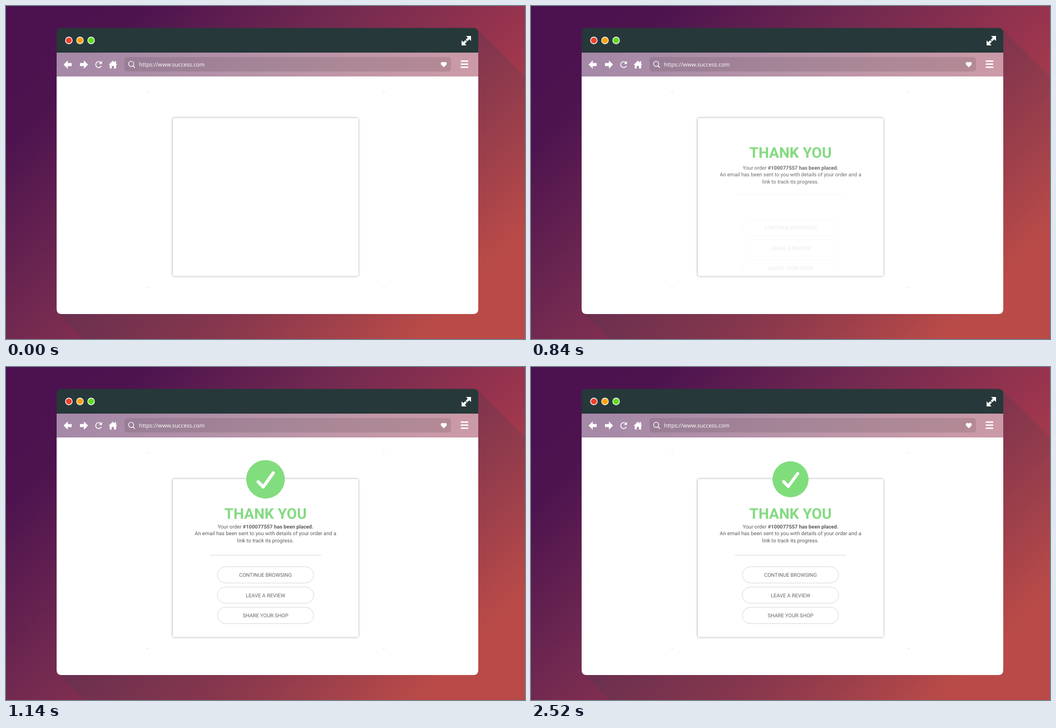
Recreate the animation shown at these times as an HTML page. Size 933 by 600 pixels, loop 2550 ms.

```html
<!DOCTYPE html>
<html lang="en">
<head>
<meta charset="utf-8">
<title>Order placed</title>
<style>
  html, body { margin: 0; width: 100%; height: 100%; overflow: hidden; }
  svg { display: block; width: 933px; height: 600px; }
  text { text-rendering: geometricPrecision; }
  .url { font: 10px "Open Sans", sans-serif; fill: #fff; }
  .card { font: 9.333px Roboto, sans-serif; fill: #5c5c5c; text-anchor: middle; }
  .title { font-size: 26.667px; font-weight: 700; fill: #83da80; }
  .bold { font-weight: 700; }
  .part { opacity: 0; }
  .line { fill: none; stroke: #fff; }
</style>
</head>
<body>
<svg viewBox="0 0 933 600">
  <defs>
    <linearGradient id="sky" gradientUnits="userSpaceOnUse" x1="0" y1="0" x2="766.5" y2="766.5">
      <stop offset="0" stop-color="#4c1150"/>
      <stop offset=".16" stop-color="#4c134f"/>
      <stop offset=".4" stop-color="#732a50"/>
      <stop offset=".62" stop-color="#99344e"/>
      <stop offset=".86" stop-color="#b94a48"/>
    </linearGradient>
    <linearGradient id="shade" gradientUnits="userSpaceOnUse" x1="0" y1="0" x2="766.5" y2="766.5">
      <stop offset=".62" stop-color="#333f4a" stop-opacity=".2"/>
      <stop offset=".88" stop-color="#333f4a" stop-opacity="0"/>
    </linearGradient>
    <filter id="soft" x="-10%" y="-10%" width="120%" height="120%">
      <feGaussianBlur stdDeviation="2.2"/>
    </filter>
    <clipPath id="view"><rect x="253" y="154.5" width="427" height="353"/></clipPath>
  </defs>

  <rect width="933" height="600" fill="url(#sky)"/>
  <path d="M848 42L933 127V600H141L94 553V300H848Z" fill="url(#shade)"/>

  <!-- window -->
  <path d="M91 84V48.500Q91 39.500 100 39.500H840Q849 39.500 849 48.500V84Z" fill="#263839"/>
  <rect x="91" y="84" width="758" height="43" fill="#fff" opacity=".5"/>
  <path d="M91 127H849V546Q849 555 840 555H100Q91 555 91 546Z" fill="#fff"/>
  <g stroke="#fff" stroke-width="1.3">
    <circle cx="113" cy="62" r="6" fill="#f0402c"/>
    <circle cx="133" cy="62" r="6" fill="#faa00c"/>
    <circle cx="153" cy="62" r="6" fill="#5fdb1e"/>
  </g>
  <g fill="#fff">
    <path d="M836 54V63L832.900 59.900L829.300 63.500L826.500 60.700L830.100 57.100L827 54Z"/>
    <path d="M819 71V62L822.100 65.100L825.700 61.500L828.500 64.300L824.900 67.900L828 71Z"/>
    <path d="M103.500 105.500L111 98V102.700H118V108.300H111V113Z"/>
    <path d="M147.500 105.500L140 98V102.700H133V108.300H140V113Z"/>
    <path d="M172.500 99V104.500H167Z"/>
    <path d="M192 98.500L195.500 101.700V99.500H198V104L200 106H198V112.500H194V108H190V112.500H186.500V106H184.500Z"/>
  </g>
  <path class="line" d="M171 102.600A5.300 5.300 0 1 0 171.400 107.800" stroke-width="1.600"/>
  <rect x="213" y="92" width="587" height="26" rx="5" opacity=".1"/>
  <circle class="line" cx="225" cy="104.300" r="4.600" stroke-width="1.300"/>
  <path class="line" d="M228.300 107.800L231.700 111.300" stroke-width="1.500"/>
  <text class="url" x="239" y="108.700">https://www.success.com</text>
  <path d="M787 110.500L782.500 106C780 103 783.500 98.500 787 101.800C790.500 98.500 794 103 791.500 106Z" fill="#fff"/>
  <path class="line" d="M817.500 99.200H831M817.500 104.700H831M817.500 110.200H831" stroke-width="2.600"/>

  <!-- page -->
  <path d="M253 154.500h1v1h-1zM679 154.500h1v1h-1zM253 507h1v1h-1zM679 507h1v1h-1z" fill="#aaa"/>
  <rect x="299.500" y="201.800" width="334" height="285" rx="3" opacity=".32" filter="url(#soft)"/>
  <rect x="300" y="202" width="333.500" height="284.500" rx="3" fill="#fff"/>
  <g class="card">
    <text class="part title" id="title" x="466.500" y="273.400">THANK YOU</text>
    <g class="part" id="note">
      <text x="466.500" y="290.600">Your order <tspan class="bold">#100077557 has been placed.</tspan></text>
      <text x="466.500" y="303.300">An email has been sent to you with details of your order and a</text>
      <text x="466.500" y="315.900">link to track its progress.</text>
    </g>
    <path class="part" id="rule" d="M366.500 339H566.500" stroke="#d6d6d6"/>
    <g class="part" id="links"></g>
  </g>
  <g clip-path="url(#view)">
    <g class="part" id="badge">
      <circle r="32.300" fill="#80dd7c"/>
      <path class="line" d="M-12.400 4.300L-4 12.900L13.100 -10.600" stroke-width="5.400" stroke-linecap="round" stroke-linejoin="round"/>
    </g>
  </g>
</svg>
<script>
  const LOOP = 2550, STEP = 30;
  const $ = id => document.getElementById(id);

  $('links').innerHTML = ['CONTINUE BROWSING', 'LEAVE A REVIEW', 'SHARE YOUR SHOP'].map((label, i) => {
    const y = 359.8 + i * 36.6;
    return `<rect x="380" y="${y}" width="173" height="29.4" rx="14.7" fill="#fff" stroke="#d4d4d4" stroke-width=".9"/>
      <text x="466.5" y="${y + 18.1}" fill="#666">${label}</text>`;
  }).join('');

  // cubic-bezier(.25, .1, .25, 1)
  function ease(x) {
    const curve = (a, b, u) => 3 * a * u * (1 - u) ** 2 + 3 * b * u * u * (1 - u) + u ** 3;
    let lo = 0, hi = 1;
    for (let i = 0; i < 24; i++) {
      const mid = (lo + hi) / 2;
      if (curve(.25, .25, mid) < x) lo = mid; else hi = mid;
    }
    return curve(.1, 1, lo);
  }

  const rise = height => p => `translate(0px, ${height * (1 - p)}px)`;
  const zoom = p => `translate(466.5px, 202.3px) scale(${5 - 4 * p})`;

  // id, start ms, duration ms, transform
  const parts = [
    ['title', 537, 290, rise(31.5)],
    ['note', 660, 290, rise(38)],
    ['rule', 803, 285, rise(0)],
    ['links', 803, 285, rise(29)],
    ['badge', 1010, 157, zoom],
  ];

  for (const [id, start, length, move] of parts) {
    const frames = [];
    for (let t = 0; t <= LOOP; t += STEP) {
      const x = Math.min(1, Math.max(0, (t - start) / length));
      const p = x === 0 || x === 1 ? x : ease(x);
      frames.push({ offset: t / LOOP, opacity: p, transform: move(p), easing: 'steps(1, end)' });
    }
    $(id).animate(frames, { duration: LOOP, iterations: Infinity });
  }
</script>
</body>
</html>
```
